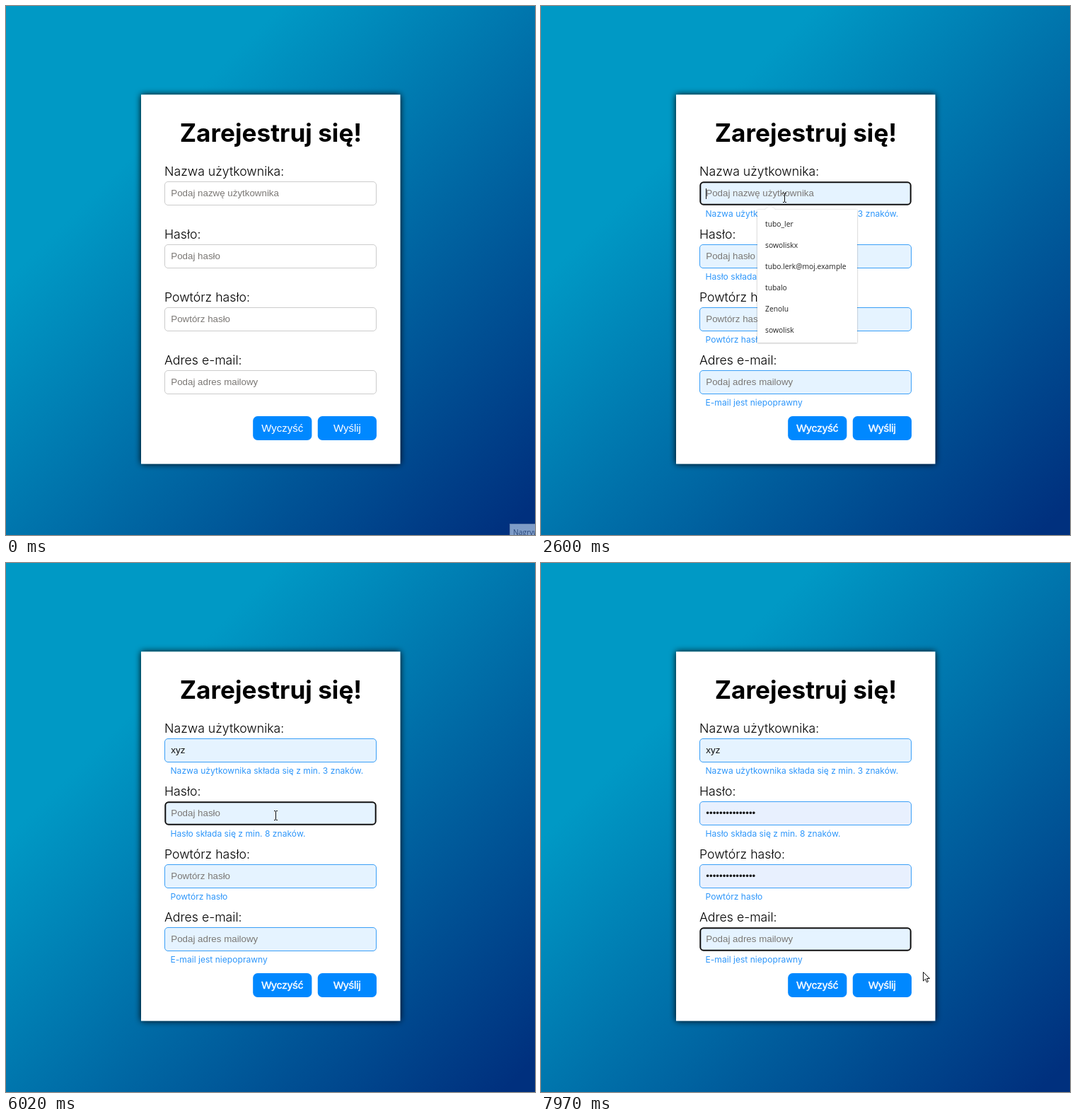
These frames come from a looping animation (748x748 px, 8000 ms). An HTML page:

```html
<!DOCTYPE html>
<html lang="pl">
<head>
<meta charset="utf-8">
<style>
  html, body { margin: 0; width: 100%; height: 100%; overflow: hidden; }
  svg { display: block; width: 748px; height: 748px; }
  text { white-space: pre; }
  .title { font: 700 35.2px Inter, sans-serif; text-anchor: middle; }
  .label { font: 300 17.7px Inter, sans-serif; fill: #000; }
  .hint { font: 400 12.1px Inter, sans-serif; fill: #2f97fa; }
  .value { font: 13.33px "Liberation Sans", sans-serif; }
  .button { font: 15px "Liberation Sans", sans-serif; fill: #fff; stroke: #fff; text-anchor: middle; }
  .menu { font: 10.3px "Open Sans", sans-serif; fill: #222; }
  .note { font: 9.45px "Open Sans", sans-serif; fill: #555; }
  .code { font: 9.8px "Noto Sans Mono", monospace; fill: #666; }
  .link { fill: #2467c9; }
</style>
</head>
<body>
<svg viewBox="0 0 748 748">
  <defs>
    <linearGradient id="sky" gradientUnits="userSpaceOnUse" x1="0" y1="0" x2="748" y2="748">
      <stop offset=".26" stop-color="#0099c5"/><stop offset=".97" stop-color="#00307e"/>
    </linearGradient>
    <filter id="cardShadow" x="-10%" y="-10%" width="120%" height="120%">
      <feDropShadow dx="0" dy="0" stdDeviation="5" flood-color="#000"/>
    </filter>
    <filter id="popShadow" x="-10%" y="-10%" width="120%" height="120%">
      <feDropShadow dx="0" dy=".5" stdDeviation=".9" flood-color="#000" flood-opacity=".35"/>
    </filter>
  </defs>
  <rect width="748" height="748" fill="url(#sky)"/>
  <rect x="191" y="125.400" width="366.400" height="522" fill="#fff" filter="url(#cardShadow)"/>
  <text class="title" x="374.5" y="192">Zarejestruj się!</text>
  <g id="rows"></g>
  <g id="buttons"></g>
  <rect id="caret" width="1" height="15" fill="#111"/>

  <g id="menu">
    <path d="M306 288h11l7-6 7 6h116v188H306z" fill="#fff" filter="url(#popShadow)"/>
  </g>
  <g id="popup">
    <path d="M306 378h11l7-6 7 6h274.500v107.500H306z" fill="#fff" filter="url(#popShadow)"/>
    <path id="popupHead" d="M306 378h299.500v38H306z"/>
    <circle cx="326" cy="397" r="4" fill="#3b82d6"/>
    <text class="menu" x="343" y="401">Użyj silnego hasła</text>
    <text class="code" x="490" y="400">kr7Tmub4LFZPC92</text>
    <text class="note" x="320" y="437.500">Nie musisz pamiętać tego hasła. Zostanie ono zapisane</text>
    <text class="note" x="320" y="454">w usłudze <tspan class="link">Skarbnik haseł Fonela</tspan> na koncie</text>
    <text class="note" x="320" y="470.500">tubo.lerk@moj.example.</text>
  </g>

  <g id="tip">
    <rect x="712.500" y="732.500" width="60" height="30" fill="#7f9dc8" stroke="#5f7fae"/>
    <text class="menu" x="717" y="747.500" style="fill:#2c4a7c">Nagrywanie</text>
  </g>

  <g id="pointer">
    <circle id="click" cx="-1.5" cy="-1" r="10"/>
    <path id="arrow" d="M.5.5V13l3-2.800 2 4.600 2-.9-2-4.400H9.500z" fill="#fff" stroke="#111"/>
    <path id="beam" d="M-2 -6.500H0M1 -6.500H3M.5-6V6M-2 6.500H0M1 6.500H3" fill="none" stroke="#111"/>
    <path id="hand" d="M-1.500 10V1.500a1.500 1.500 0 0 1 3 0V7c1-1 2.600-.7 2.800.4 1-.8 2.400-.4 2.600.6 1-.5 2.100.2 2.100 1.300V13c0 2-1 3-1.500 5H0c-.5-2-3-4.500-4-7-.5-1.300 1.200-2 2.500-1z" fill="#fff" stroke="#123" stroke-width=".8"/>
  </g>
</svg>
<script>
const LOOP = 8000, BLINK = 530;
const ERRORS_AT = 1680, FILLED_AT = 7180;
const $ = id => document.getElementById(id);
const set = (el, attrs) => { for (const k in attrs) el.setAttribute(k, attrs[k]); };
const show = (id, on) => { $(id).style.display = on ? '' : 'none'; };
const within = (t, from, to) => t >= from && t < to;

const FIELDS = [
  ['Nazwa użytkownika:', 'Podaj nazwę użytkownika', 'Nazwa użytkownika składa się z min. 3 znaków.'],
  ['Hasło:', 'Podaj hasło', 'Hasło składa się z min. 8 znaków.'],
  ['Powtórz hasło:', 'Powtórz hasło', 'Powtórz hasło'],
  ['Adres e-mail:', 'Podaj adres mailowy', 'E-mail jest niepoprawny']
];
const rowTop = i => 248 + 89 * i;

$('rows').innerHTML = FIELDS.map(([label, holder, hint], i) => {
  const y = rowTop(i);
  return `<text class="label" x="224" y="${y - 8}">${label}</text>
    <rect class="box" rx="4.5"/>
    <text class="value" x="233.3" y="${y + 21}">${holder}</text>
    <text class="hint" x="232.5" y="${y + 49.5}">${hint}</text>`;
}).join('');

const BUTTONS = [[349.2, 'Wyczyść'], [440.8, 'Wyślij']], BUTTON_WIDTH = 83.2;
$('buttons').innerHTML = BUTTONS.map(([x, name]) =>
  `<rect x="${x}" y="580" width="${BUTTON_WIDTH}" height="34" rx="6.5"/>
   <text class="button" x="${x + BUTTON_WIDTH / 2}" y="602">${name}</text>`).join('');

$('menu').innerHTML += ['tubo_ler', 'sowoliskx', 'tubo.lerk@moj.example', 'tubalo', 'Zenolu', 'sowolisk']
  .map((name, i) => `<text class="menu" x="317" y="${312 + 30 * i}">${name}</text>`).join('');

const all = selector => [...document.querySelectorAll(selector)];
const boxes = all('.box'), values = all('.value'), hints = all('.hint');
const buttonBoxes = all('#buttons rect'), buttonTexts = all('.button');

// time, x, y of the pointer
const PATH = [
  [230, 702, 752], [660, 622, 614], [1050, 527, 503], [1400, 493, 589], [1850, 493, 589],
  [2270, 344, 271], [3550, 344, 271], [3770, 349, 311], [4360, 349, 311], [4900, 370, 353],
  [5780, 370, 353], [6480, 410, 367], [6870, 410, 367], [7030, 414, 392], [7260, 414, 392],
  [7670, 468, 505], [7970, 540, 578]
];
// press (green) from, release (red) from, gone
const CLICKS = [[1490, 1680, 1850], [2490, 2530, 2600], [5260, 5500, 5610], [7090, 7140, 7200]];
// time, focused row, typed characters
const FOCUS = [[2490, 0, 0], [3290, 0, 1], [3550, 0, 2], [4030, 0, 3], [5260, 1, 3], [FILLED_AT, 3, 3]];

function pointerAt(t) {
  const next = PATH.findIndex(p => p[0] > t);
  if (next === 0) return [760, 760];
  if (next < 0) return PATH.at(-1).slice(1);
  const [t0, x0, y0] = PATH[next - 1], [t1, x1, y1] = PATH[next];
  let k = (t - t0) / (t1 - t0);
  // the entry is one continuous sweep
  if (next === 1) k = k * k * (2 - k);
  else if (next === 2) k += k * k * (1 - k);
  else k = k * k * (3 - 2 * k);
  return [x0 + (x1 - x0) * k, y0 + (y1 - y0) * k];
}

function render(t) {
  const focus = FOCUS.findLast(f => t >= f[0]);
  const row = focus ? focus[1] : -1;
  const typed = 'xyz'.slice(0, focus ? focus[2] : 0);
  const errors = t >= ERRORS_AT, filled = t >= FILLED_AT;
  const dots = filled ? '•'.repeat(15) : '';
  const texts = [typed, dots, dots, ''];

  FIELDS.forEach(([, holder], i) => {
    const focused = i === row, inset = focused ? 1.3 : .5;
    set(boxes[i], {
      x: 224 + inset, y: rowTop(i) + inset, width: 300 - 2 * inset, height: 34 - 2 * inset,
      fill: texts[i] && i ? '#e8f0fe' : errors ? '#e5f3ff' : '#fff',
      stroke: focused ? '#101010' : errors ? '#3a9ff7' : '#ccc',
      'stroke-width': focused ? 2 : 1
    });
    values[i].textContent = texts[i] || holder;
    values[i].style.fill = texts[i] ? '#111' : '#7b7875';
    hints[i].style.display = errors ? '' : 'none';
  });

  show('caret', focus && Math.floor((t - focus[0]) / BLINK) % 2 === 0);
  if (focus) set($('caret'), { x: Math.round(233.3 + (row ? 0 : 6.67 * typed.length)), y: rowTop(row) + 10 });

  const popupOpen = within(t, 6870, 7260);
  show('menu', within(t, 2600, 3290));
  show('popup', popupOpen);
  show('tip', t < 70);
  $('tip').style.opacity = t < 30 ? 1 : .5;

  const [x, y] = pointerAt(t);
  const over = BUTTONS.findIndex(([left]) => within(x, left, left + BUTTON_WIDTH) && within(y, 580, 614));
  const onField = within(x, 224, 524) && FIELDS.some((_, i) => within(y, rowTop(i), rowTop(i) + 34));
  const onPopup = popupOpen && y >= 378;
  set($('popupHead'), { fill: onPopup ? '#e8e8e8' : '#fff' });
  buttonBoxes.forEach((b, i) => set(b, { fill: i === over ? '#006ac0' : '#0088ff' }));
  buttonTexts.forEach(b => set(b, { 'stroke-width': errors ? .4 : 0 }));

  set($('pointer'), { transform: `translate(${Math.round(x)} ${Math.round(y)})` });
  const shape = over >= 0 ? 'hand' : onField && !onPopup ? 'beam' : 'arrow';
  for (const id of ['hand', 'beam', 'arrow']) show(id, id === shape);

  const click = CLICKS.find(c => within(t, c[0], c[2]));
  show('click', click);
  if (click) set($('click'), t < click[1]
    ? { fill: '#98b845', opacity: .8 }
    : { fill: '#f5505a', opacity: .7 });
}

const start = performance.now();
function tick() {
  render((performance.now() - start) % LOOP);
  requestAnimationFrame(tick);
}
tick();
</script>
</body>
</html>
```
